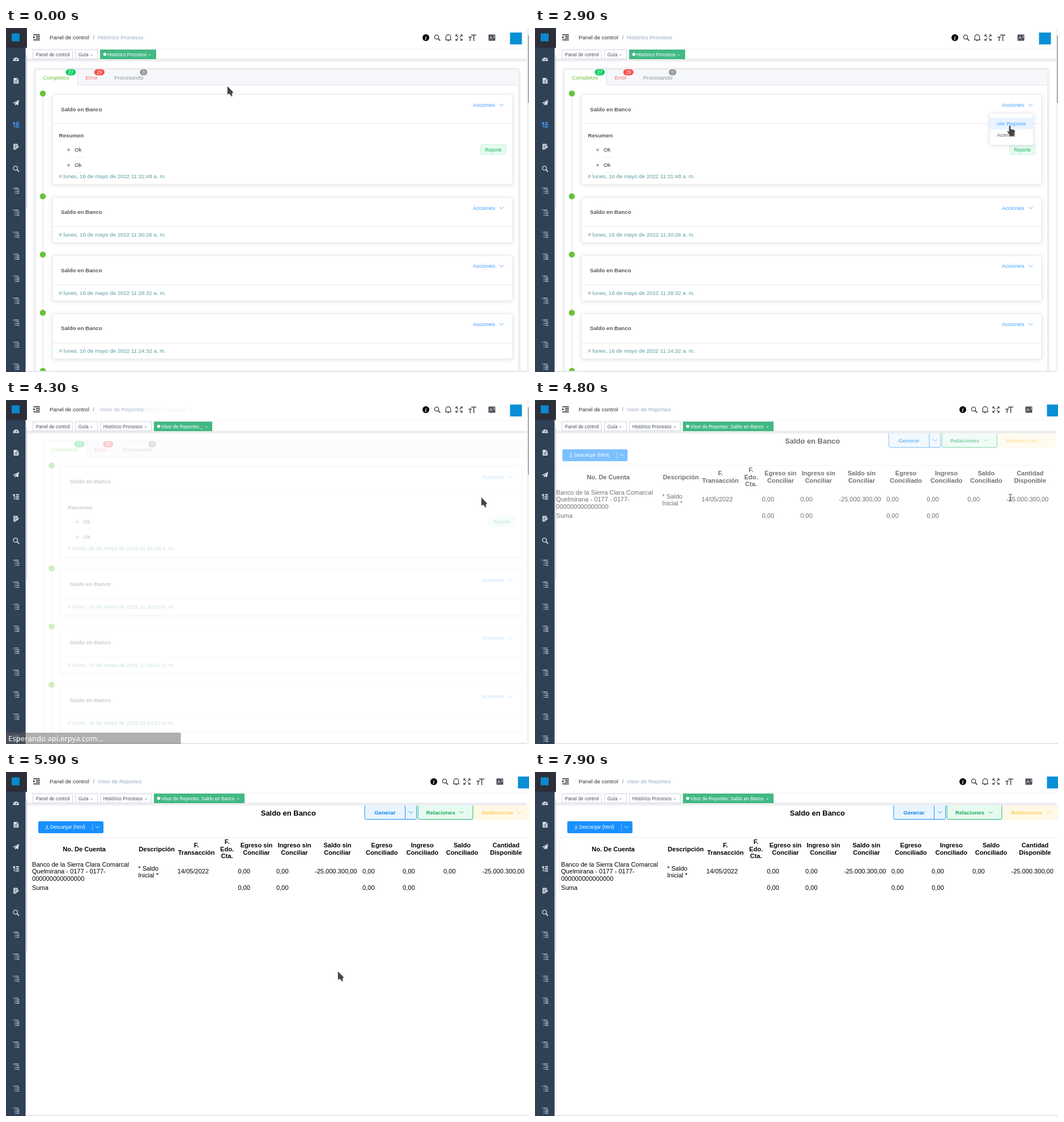
These frames come from a looping animation (923x607 px, 8300 ms). An HTML page:

```html
<!DOCTYPE html>
<html lang="es">
<head>
<meta charset="utf-8">
<title>Panel de control</title>
<style>
  html, body { margin: 0; width: 100%; height: 100%; overflow: hidden; background: #fff; }
  svg { display: block; width: 923px; height: 607px; font: 9.69px "Liberation Sans", Arial, sans-serif; }
  text { white-space: pre; }
  .s { font-size: 8.3px; }
  .l { font-size: 11.07px; }
  .b { font-weight: bold; }
  .m { text-anchor: middle; }
  .card { filter: drop-shadow(0 1.4px 3.5px rgba(0,0,0,.12)); }
</style>
</head>
<body>
<svg id="stage" viewBox="0 0 923 607"></svg>
<script>
const LOOP = 8300;
const text = (x, y, str, fill, cls = '') => `<text x="${x}" y="${y}" fill="${fill}" class="${cls}">${str}</text>`;
const rect = (x, y, w, h, fill, more = '') => `<rect x="${x}" y="${y}" width="${w}" height="${h}" fill="${fill}" ${more}/>`;
const line = (d, color, w = 1) => `<path d="${d}" fill="none" stroke="${color}" stroke-width="${w}"/>`;
const fill = (d, color) => `<path d="${d}" fill="${color}" fill-rule="evenodd"/>`;
const dot = (x, y, r, color, more = '') => `<circle cx="${x}" cy="${y}" r="${r}" fill="${color}" ${more}/>`;
const at = (x, y, body) => `<g transform="translate(${x} ${y})">${body}</g>`;
const group = (id, body, more = '') => `<g id="${id}" ${more}>${body}</g>`;
const chevron = (x, y, color) => line(`M${x - 3.7} ${y - 1.8}l3.7 3.7 3.7-3.7`, color, .9);
const lens = (color, w) => dot(-1, -1, 3.6, 'none', `stroke="${color}" stroke-width="${w}"`) + line('M1.8 1.8L5.3 5.3', color, w + .4);

/* Sidebar */
const treeIcon = c =>
  line('M-5.2-4.5H-3.6M-2.6-4.5H4.5M-2.4-1.4H-.8M.4-1.4H5.8M-2.4 1.6H-.8M.4 1.6H5.8M-2.4 4.6H-.8M.4 4.6H5.8', c, 1.1);
const sideIcons = {
  gauge: c => fill('M-5 4A5.2 5.2 0 1 1 5 4ZM-.8 2.8H1L1.7-2.5Z', c) +
    [[-3, 1], [-2.2, -1.4], [0, -2.6], [3, 1]].map(p => dot(...p, .7, '#304156')).join(''),
  page: c => fill('M-4.2-5H1.5L4.5-2V5H-4.2ZM-2.4-.5V.5H2.6V-.5ZM-2.4 2V3H2.6V2ZM1-4V-1.6H3.4Z', c),
  plane: c => fill('M5.5-5L3.5 4.5 0 2.8-2 5V1.8L3.5-3-3.3 1.4-5.5.4Z', c),
  tree: c => fill('M-5.2-4.5H-1.8V-1.6H-5.2ZM0-4.5H5.2V-2.3H0ZM0-.8H5.2V1.2H0ZM0 2.8H5.2V4.8H0Z', c) +
    line('M-3.5-2V3.8H0M-3.5.2H0', c),
  form: c => fill('M-4.5-5H3V-.5L0 3V5H-4.5ZM-3-3V-2H1.6V-3ZM-3-.6V.4H1.6V-.6ZM-3 1.8V2.8H-.5V1.8Z', c) +
    line('M.8 3L4.8-.8', c, 1.8),
  find: c => lens(c, 1.3)
};
const sideOrder = ['gauge', 'page', 'plane', 'tree', 'form', 'find'];
const pale = '#dde3ea';
let sidebar = rect(0, 0, 34.6, 607, '#304156') + rect(0, 0, 37, 35, '#2b2f3a') + rect(10, 9.5, 14, 14, '#0a88cf');
for (let i = 0; i < 15; i++) {
  const draw = sideIcons[sideOrder[i]] || treeIcon;
  const y = 54.3 + i * 38.8;
  sidebar += at(17.7, y, i === 3 ? group('treeOn', draw('#409eff')) + group('treeOff', draw(pale)) : draw(pale));
}
sidebar += rect(36, 48, 1, 269, '#b9bbbf');

/* Top bar */
const ink = '#303133', crumb = '#97a8be';
const burger = line('M48.3 12H59.8M52.8 15H59.8M52.8 18H59.8M48.3 21H59.8', '#222', 1.4) + fill('M48.3 13.9V19.1L51.4 16.5Z', '#222');
const navIcons =
  dot(741, 17, 6, '#000') +
  `<text x="741" y="20.7" fill="#fff" class="m b" style="font:italic bold 10px 'Liberation Serif',serif">i</text>` +
  at(761, 17, lens('#3c3f46', 1.4)) +
  line('M774.8 20.8H786.2M776.3 20.5V16A4.2 4.2 0 0 1 784.7 16V20.5M779 22.3H782M780.5 10.8V12', '#3c3f46', 1.2) +
  line('M794 15V12H797M802 12H805V15M805 19V22H802M797 22H794V19M794.3 12.3L798 16M804.7 12.3L801 16M804.7 21.7L801 18M794.3 21.7L798 18', '#3c3f46', 1.2) +
  line('M821 12.5H830M825.6 12V23M816.5 16H822M819.2 16V23', '#3c3f46', 1.5) +
  rect(851.5, 11.5, 12, 11, '#4b4f57', 'rx="1"') + text(856, 20.3, 'A', '#fff', 's m') +
  line('M860 14H863M860 16.5H863', '#fff', .8) +
  rect(889.5, 8, 21, 21, '#0a8fd6');
const nav = rect(37, 0, 886, 57, '#fff') + burger + text(77, 20, 'Panel de control', ink) +
  text(153.5, 20, '/', '#a9adb5', 'b') +
  group('oldCrumb', text(0, 20, 'Histórico Procesos', crumb) + group('oldSlash', text(88, 20, '/', '#c0c4cc', 'b'))) +
  group('newCrumb', text(0, 20, 'Visor de Reportes', crumb)) +
  group('icons', navIcons);

/* Page tags */
function tag(x, w, label, closeX, active) {
  const color = active ? '#fff' : '#495060';
  return rect(x + .5, 38.5, w - 1, 16, active ? '#42b983' : '#fff', `stroke="${active ? '#42b983' : '#d0d5de'}"`) +
    (active ? dot(x + 8.5, 46.5, 2.8, '#fff') : '') +
    text(x + (active ? 13 : 5.7), 50, label, color, 's') +
    (closeX ? line(`M${closeX - 1.4} 46.2l2.8 2.8m0-2.8l-2.8 2.8`, active ? '#d5f0e4' : '#8b909b', .8) : '');
}
const tags = rect(37, 36, 882, 1, '#f2f3f6') + rect(37, 54.5, 882, 1, '#d8dce5') +
  rect(37, 55.5, 882, 1.2, '#f0f1f4') + rect(37, 56.7, 882, 1, '#dadce0') + rect(37, 57.7, 882, 1.5, '#f1f2f4') +
  tag(47, 71, 'Panel de control') + tag(122, 40, 'Guía', 151) +
  group('tagsList', tag(166, 99, 'Histórico Procesos', 253.5, true)) +
  group('tagsReport', tag(166, 91, 'Histórico Procesos', 247) +
    group('tagWait', tag(261, 103, 'Visor de Reportes:_', 353.5, true)) +
    group('tagReady', tag(261, 160, 'Visor de Reportes: Saldo en Banco', 410, true)));

/* Process list */
const blue = '#409eff', green = '#67c23a';
const badge = (x, w, n, color) => rect(x, 72.8, w, 10.6, color, 'rx="5.3"') + text(x + w / 2, 81, n, '#fff', 's m');
function card(y, h, sep, time) {
  return dot(65, y - 2, 5.3, green) +
    rect(82, y + .3, 812, h, '#fff', 'rx="2.8" stroke="#e6e9f0" stroke-width=".8" class="card"') +
    line(`M82 ${y + sep}H894`, '#e6e9f0') +
    text(97, y + 29, 'Saldo en Banco', '#55585e', 'b') +
    text(824, y + 21.6, 'Acciones', blue) + chevron(874.5, y + 18.3, blue) +
    text(93.5, y + h - 10.3, `# lunes, 16 de mayo de 2022 ${time} a. m.`, '#5a9a9b');
}
const item = y => dot(110.5, y - 3, 1.6, '#fff', 'stroke="#303133" stroke-width=".8"') + text(121, y, 'Ok', ink) +
  line(`M122 ${y + 10}H137`, '#e3e5e9', .8);
const list =
  rect(51.5, 72.5, 853.5, 560, '#fff', 'stroke="#dcdfe6" class="card"') +
  rect(52, 73, 852.5, 27.5, '#f5f7fa') + line('M52 100.5H905', '#e4e7ed') +
  rect(52, 73, 74, 28.2, '#fff') + line('M126.5 73V100.5', '#dcdfe6') +
  text(65, 91.3, 'Completos', green) + text(140.5, 91.3, 'Error', '#f56c6c') + text(191, 91.3, 'Procesando', '#909399') +
  badge(105.3, 18, 27, '#13ce66') + badge(155.8, 18, 29, '#ff4949') + badge(236.3, 13, 0, '#909399') +
  rect(64.4, 121, 1.3, 490, '#e4e7ed') +
  card(117.6, 158, 51, '11:31:48') +
  text(93.5, 193, 'Resumen', '#55585e', 'b') + item(218) + item(245) +
  rect(837.5, 205.5, 45.5, 18, '#e7faf0', 'rx="2.8" stroke="#d0f5e0"') + text(845.3, 217.6, 'Reporte', '#13b95c', 's') +
  card(299, 79.2, 51.5, '11:30:26') + card(401.7, 79.2, 51.5, '11:28:32') +
  card(504.4, 79.2, 51.5, '11:24:32') + card(607.1, 79.2, 51.5, '11:20:10');
const menu = rect(802.5, 150.5, 77, 56, '#fff', 'rx="2.8" stroke="#e6e9f0" stroke-width=".8" class="card"') +
  group('hover', rect(803, 158, 76, 20.7, '#e8f4ff')) +
  group('itemOff', text(815, 171.8, 'Ver Reporte', '#606266')) +
  group('itemOn', text(815, 171.8, 'Ver Reporte', '#46a6ff')) +
  text(815, 192.2, 'Acercar', '#606266');

/* Report */
const button = (x, w, bg, color) => rect(x + .5, 58.5, w, 25, bg, `rx="2" stroke="${color}"`);
const heads = [
  [138, 'No. De Cuenta'], [266, 'Descripción'], [336, 'F.', 'Transacción'], [390, 'F.', 'Edo.', 'Cta.'],
  [442, 'Egreso sin', 'Conciliar'], [509, 'Ingreso sin', 'Conciliar'], [585, 'Saldo sin', 'Conciliar'],
  [663.3, 'Egreso', 'Conciliado'], [734.7, 'Ingreso', 'Conciliado'], [805, 'Saldo', 'Conciliado'],
  [882.5, 'Cantidad', 'Disponible']
];
const lines = (x, mid, rows, cls) =>
  rows.map((row, i) => text(x, mid + (i - (rows.length - 1) / 2) * 12.45, row, '#000', cls)).join('');
const cells = (y, str, xs) => xs.map(x => text(x, y, str, '#000', 'l')).join('');
const report =
  `<text x="449.8" y="77.3" class="b" style="font-size:12.95px">Saldo en Banco</text>` +
  button(632.5, 91.5, '#e8f4ff', '#1890ff') + line('M704.5 59V83', '#1890ff') +
  text(650.3, 74.8, 'Generar', '#1682e6', 'b') + chevron(714.7, 71, '#1682e6') +
  button(726.5, 97, '#e7faf0', '#20b45f') + text(741.7, 74.8, 'Relaciones', '#1fab59', 'b') + chevron(804, 71, '#1fab59') +
  button(826, 100, '#fff8e6', '#fff4d8') + text(840.3, 74.8, 'Referencias', '#ffcf60', 'b') + chevron(906, 71, '#ffcf60') +
  rect(57, 87, 115, 21, '#1890ff', 'rx="2"') + line('M152.5 92V103', '#8fc9ff', .8) +
  line('M72.5 93.5V98M70.8 96.5L72.5 98.2 74.2 96.5M69.5 100.2H75.5', '#fff', .8) +
  text(78, 100, 'Descargar (html)', '#fff', 's') + chevron(161.5, 97, '#fff') +
  line('M43.5 212V115.5H923', '#e9ecf2') +
  heads.map(([x, ...rows]) => lines(x, 139.6, rows, 'l b m')).join('') +
  lines(46, 179.3, ['Banco de la Sierra Clara Comarcal', 'Quelmirana - 0177 - 0177-', '000000000000000'], 'l') +
  lines(233.3, 179.8, ['* Saldo', 'Inicial *'], 'l') +
  text(302.5, 179.3, '14/05/2022', '#000', 'l') +
  cells(179.3, '0,00', [409.3, 477, 629, 700, 772]) + cells(179.3, '-25.000.300,00', [545, 840.5]) +
  text(46, 208, 'Suma', '#000', 'l') + cells(208, '0,00', [409.3, 477, 629, 700]);

/* Pointer */
const outline = 'fill="#454545" stroke="#fff" stroke-opacity=".75" stroke-width=".7" stroke-linejoin="round"';
const pointers = {
  arrow: `<path d="M-.5-.8V15L3 13 7.3 18.3 8.5 17.8 8 13 10.3 10.3Z" ${outline}/>`,
  hand: `<path d="M-1.7 1.2Q0-1 1.7 1.2V6.2L7.5 7.6Q9.4 8.3 9.2 10.2L8 15.5V19H-1V16.2L-4.8 10.8Q-4.6 8.8-1.7 10.8Z" ${outline}/>`,
  beam: line('M-3-6Q0-6 0-4.4Q0-6 3-6M0-5V4.2M-3 5.4Q0 5.4 0 3.8Q0 5.4 3 5.4', '#444', 1)
};
const moves = [
  [0, 391, 103, 'arrow'], [400, 436, 98, 'arrow'], [500, 545, 100, 'arrow'], [600, 640, 110, 'arrow'], [700, 687, 118, 'arrow'],
  [900, 736, 121, 'arrow'], [1000, 800, 126, 'arrow'], [1100, 838, 131, 'hand'], [2900, 838, 172, 'hand'],
  [4100, 839, 172, 'arrow'], [4700, 839, 172, 'beam'],
  [5600, 800, 222, 'arrow'], [5700, 715, 300, 'arrow'], [5800, 638, 342, 'arrow'], [5900, 586, 352, 'arrow'],
  [6000, 500, 338, 'arrow'], [6100, 420, 300, 'arrow'], [6200, 382, 250, 'arrow'], [6300, 450, 200, 'arrow'],
  [6400, 542, 174, 'beam'], [6500, 552, 303, 'arrow'], [6700, 560, 228, 'arrow'], [7000, 544, 228, 'arrow'],
  [7300, 165, 43, 'arrow'], [7700, 55, 2, 'arrow'], [7900, 55, -40, 'arrow']
];

const stage = document.getElementById('stage');
stage.innerHTML =
  '<clipPath id="main"><rect x="37" y="57" width="886" height="550"/></clipPath>' +
  rect(0, 0, 923, 607, '#fff') +
  `<g clip-path="url(#main)">${group('list', list)}${group('report', report)}</g>` +
  group('menu', menu) + nav + tags + sidebar + rect(37, 605, 886, 2, '#e6e7ea') +
  group('scroll', rect(919, 0, 4, 607, '#f3f3f4') + rect(921, 13, 2, 119, '#a9abae')) +
  group('status', rect(0, 587, 308.5, 20, '#606060', 'rx="1.5" fill-opacity=".5"') +
    `<text x="4" y="602" fill="#fff" style="font:13.2px 'Noto Sans','Open Sans',sans-serif">Esperando api.erpya.com...</text>`) +
  group('pointer', Object.entries(pointers).map(([k, body]) => group(k, body)).join(''));

const el = {};
stage.querySelectorAll('g[id]').forEach(g => el[g.id] = g);
const show = (id, on) => el[id].setAttribute('visibility', on ? 'inherit' : 'hidden');
const place = (id, x, y, alpha = 1) => {
  el[id].setAttribute('transform', `translate(${x} ${y})`);
  el[id].setAttribute('opacity', alpha);
};
const clamp = v => Math.max(0, Math.min(1, v));

// The CSS "ease" curve, solved by bisection
function ease(x) {
  if (x <= 0 || x >= 1) return clamp(x);
  let lo = 0, hi = 1, s;
  for (let i = 0; i < 20; i++) {
    s = (lo + hi) / 2;
    const bx = .75 * s * (1 - s) ** 2 + .75 * s * s * (1 - s) + s ** 3;
    if (bx < x) lo = s; else hi = s;
  }
  return .3 * s * (1 - s) ** 2 + 3 * s * s * (1 - s) + s ** 3;
}

const FADE = 1.7; // opacity falls faster than the slide

function render(t) {
  const leave = ease((t - 4150) / 500), enter = ease((t - 4590) / 500), swap = ease((t - 4040) / 500);
  const reportOn = t >= 4600, tagsOn = t >= 4100, hover = t >= 2900;

  show('list', !reportOn);
  place('list', 30 * leave, 0, (1 - leave) ** FADE);
  show('report', reportOn);
  place('report', -30 * (1 - enter), 0, enter ** FADE);
  place('icons', reportOn ? 14 : 0, 0);
  show('scroll', !reportOn);

  place('oldCrumb', tagsOn ? 220 + 20 * swap : 162, 0, 1 - swap);
  show('oldSlash', tagsOn);
  place('newCrumb', 162 + 20 * (1 - swap), 0, swap);
  show('tagsList', !tagsOn);
  show('tagsReport', tagsOn);
  show('tagWait', tagsOn && !reportOn);
  show('tagReady', reportOn);
  show('treeOn', !tagsOn);
  show('treeOff', tagsOn);
  show('status', t >= 4200 && t < 4700);

  const open = ease((t - 1300) / 300) * (1 - ease((t - 3950) / 300));
  show('menu', open > 0);
  el.menu.setAttribute('transform', `translate(0 ${150 * (1 - open)}) scale(1 ${open})`);
  el.menu.setAttribute('opacity', open);
  show('hover', hover);
  show('itemOn', hover);
  show('itemOff', !hover);

  const [, x, y, kind] = moves.filter(m => m[0] <= t).pop();
  place('pointer', x, y);
  for (const k in pointers) show(k, k === kind);
}

function tick() {
  render(Math.floor(performance.now() % LOOP / 100) * 100);
  requestAnimationFrame(tick);
}
tick();
</script>
</body>
</html>
```
